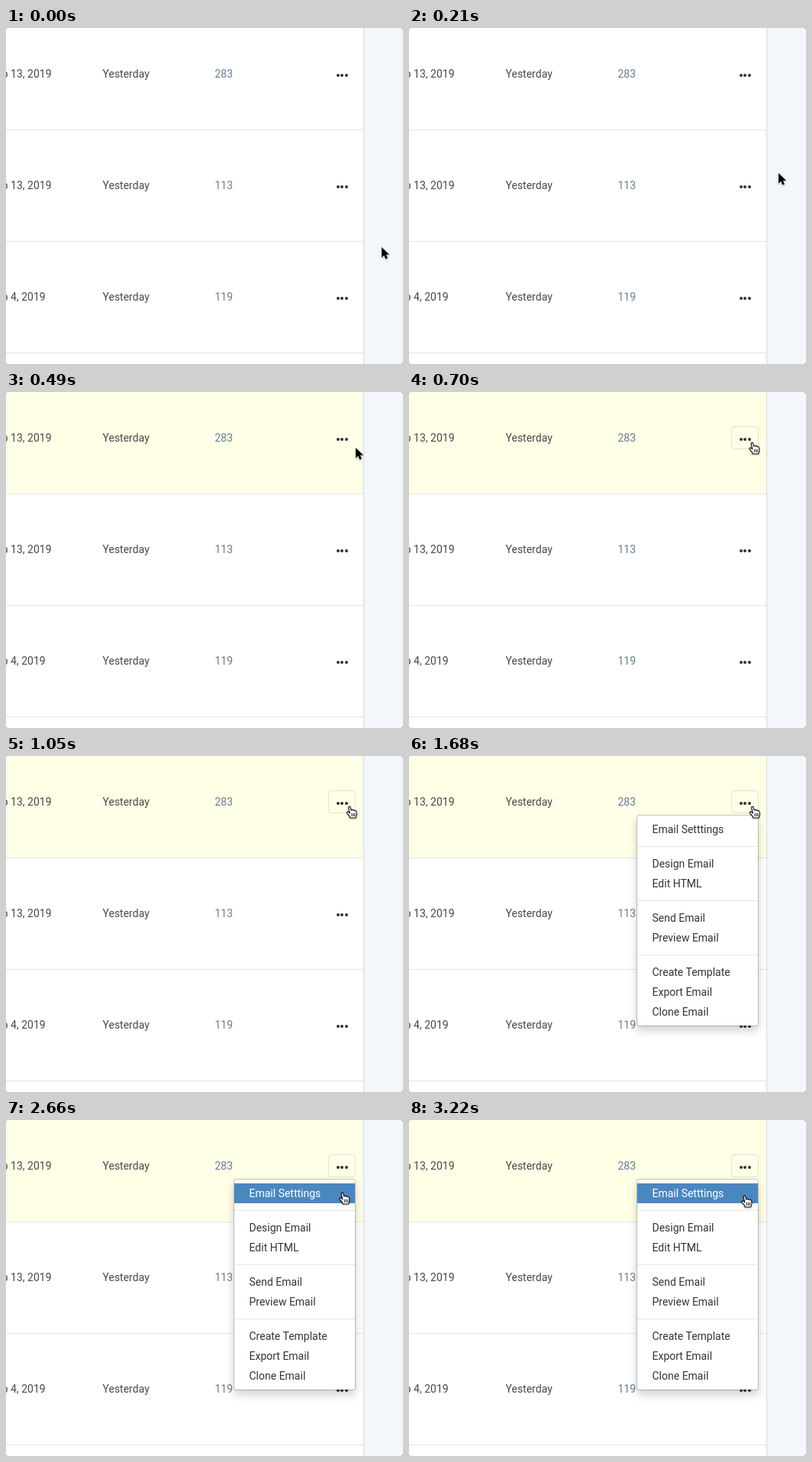
Recreate the animation shown at these times as an HTML page. Size 520x440 px, loop 4.06 s.

```html
<!DOCTYPE html>
<html lang="en">
<head>
<meta charset="utf-8">
<title>Email list menu</title>
<style>
  html, body { margin: 0; width: 100%; height: 100%; overflow: hidden; background: #8a8c90; }
  #stage { position: relative; width: 520px; height: 440px; overflow: hidden; border-radius: 3px;
    background: #f3f7fc; font: 14px/20px Roboto, sans-serif; color: #484848; }
  #stage * { position: absolute; box-sizing: border-box; white-space: nowrap; }
  .table { left: 0; top: 0; width: 469px; height: 440px; background: #fff; border-right: 1px solid #d5d9df; }
  .row { left: 0; width: 468px; height: 146px; border-bottom: 1px solid #e3e4e5; }
  .row.hover { background: #ffffe8; }
  .row span { top: 62px; }
  .date { left: -21px; }
  .seen { left: 126.5px; }
  .count { left: 273.5px; color: #687d95; }
  .more { left: 422px; top: 57px; width: 36px; height: 30px; border: 1px solid transparent; border-radius: 4px; }
  .more.on { border-color: #e2e2cf; }
  .more i { top: 13.5px; width: 4px; height: 4px; border-radius: 50%; background: #333; }
  #menu { left: 298px; top: 77px; width: 160px; height: 277px; background: #fff; border: 1px solid rgba(0,0,0,.2);
    border-radius: 4px; background-clip: padding-box; box-shadow: 0 6px 12px rgba(0,0,0,.175); color: #333; }
  #menu div { left: 0; width: 158px; height: 26px; padding-left: 19.5px; line-height: 26px; }
  #menu div.on { background: #4b87bf; color: #fff; }
  #menu hr { left: 0; width: 158px; height: 1px; margin: 0; border: 0; background: #e5e5e5; }
  #stage svg { left: 0; top: 0; overflow: visible; filter: drop-shadow(0 1px 1px rgba(0,0,0,.3)); }
</style>
</head>
<body>
<div id="stage">
  <div class="table" id="table"></div>
  <div id="menu"></div>
  <svg id="arrow" width="12" height="18">
    <path d="M0 0V13.6L3.2 10.7L5.3 15.6L8 14.4L5.9 9.7H10.1Z" fill="#000" stroke="#fff" stroke-width="1" paint-order="stroke"/>
  </svg>
  <svg id="hand" width="16" height="18" fill="#fff" stroke="#111" stroke-width="1.1" stroke-linejoin="round" stroke-linecap="round">
    <path d="M5 16V14.6C4 13 2.2 11.4 1.3 10C.4 8.6 1.6 7.4 2.9 8.2L4.9 9.8L3.2 3C2.8 1 4.9.4 5.5 2.2L6.8 6.2C7 4.9 8.7 4.9 9.1 6.3C9.5 5.3 11 5.5 11.3 6.9C11.8 6.1 13.2 6.5 13.5 7.9C14 9.8 14.2 11.6 13.4 13.2L12.8 16Z"/>
    <path d="M7.3 10.3L7.6 13.6M9.4 10.2L9.6 13.6M11.4 10.2V13.6" fill="none" stroke-width=".9"/>
  </svg>
</div>
<script>
const LOOP = 4060, HOVER = 490, BUTTON = 560, OPEN = 1680, PICK = 2590;

// time, x, y of the pointer; each place holds until the next
const path = [
  [0, 492, 287], [70, 491, 276], [140, 488, 238], [210, 484, 190],
  [280, 479, 146], [350, 474, 110], [420, 468, 85], [490, 458, 73],
  [560, 450, 70], [630, 447, 67], [700, 445, 65], [770, 444.5, 65], [1050, 445.5, 65],
  [2450, 441, 69], [2520, 439, 77], [2590, 437, 87], [2660, 436, 94], [2730, 435, 98]
];
const rows = [['Sep 13, 2019', 283], ['Sep 13, 2019', 113], ['Sep 4, 2019', 119], ['', '']];
const groups = [
  ['Email Setttings'],
  ['Design Email', 'Edit HTML'],
  ['Send Email', 'Preview Email'],
  ['Create Template', 'Export Email', 'Clone Email']
];
const $ = id => document.getElementById(id);

const dots = [9, 14.5, 20].map(x => `<i style="left:${x + .5}px"></i>`).join('');
$('table').innerHTML = rows.map(([date, count], i) => `
  <div class="row" style="top:${i * 146 - 12}px">
    <span class="date">${date}</span><span class="seen">${date && 'Yesterday'}</span>
    <span class="count">${count}</span><div class="more">${date && dots}</div>
  </div>`).join('');

let y = 5, items = '';
groups.forEach((group, i) => {
  if (i) {
    items += `<hr style="top:${y + 9}px">`;
    y += 19;
  }
  for (const label of group) {
    items += `<div style="top:${y}px">${label}</div>`;
    y += 26;
  }
});
$('menu').innerHTML = items;

const row = document.querySelector('.row');
const more = document.querySelector('.more');
const first = document.querySelector('#menu div');
const show = (el, on) => { el.style.visibility = on ? 'visible' : 'hidden'; };

function draw(t) {
  const [, px, py] = path.findLast(p => p[0] <= t);
  const hand = t >= BUTTON;
  show($('arrow'), !hand);
  show($('hand'), hand);
  $(hand ? 'hand' : 'arrow').style.transform = `translate(${px}px, ${py}px)`;
  row.classList.toggle('hover', t >= HOVER);
  more.classList.toggle('on', hand);
  show($('menu'), t >= OPEN);
  first.classList.toggle('on', t >= PICK);
}

const start = performance.now();
function tick() {
  draw((performance.now() - start) % LOOP);
  requestAnimationFrame(tick);
}
tick();
</script>
</body>
</html>
```
